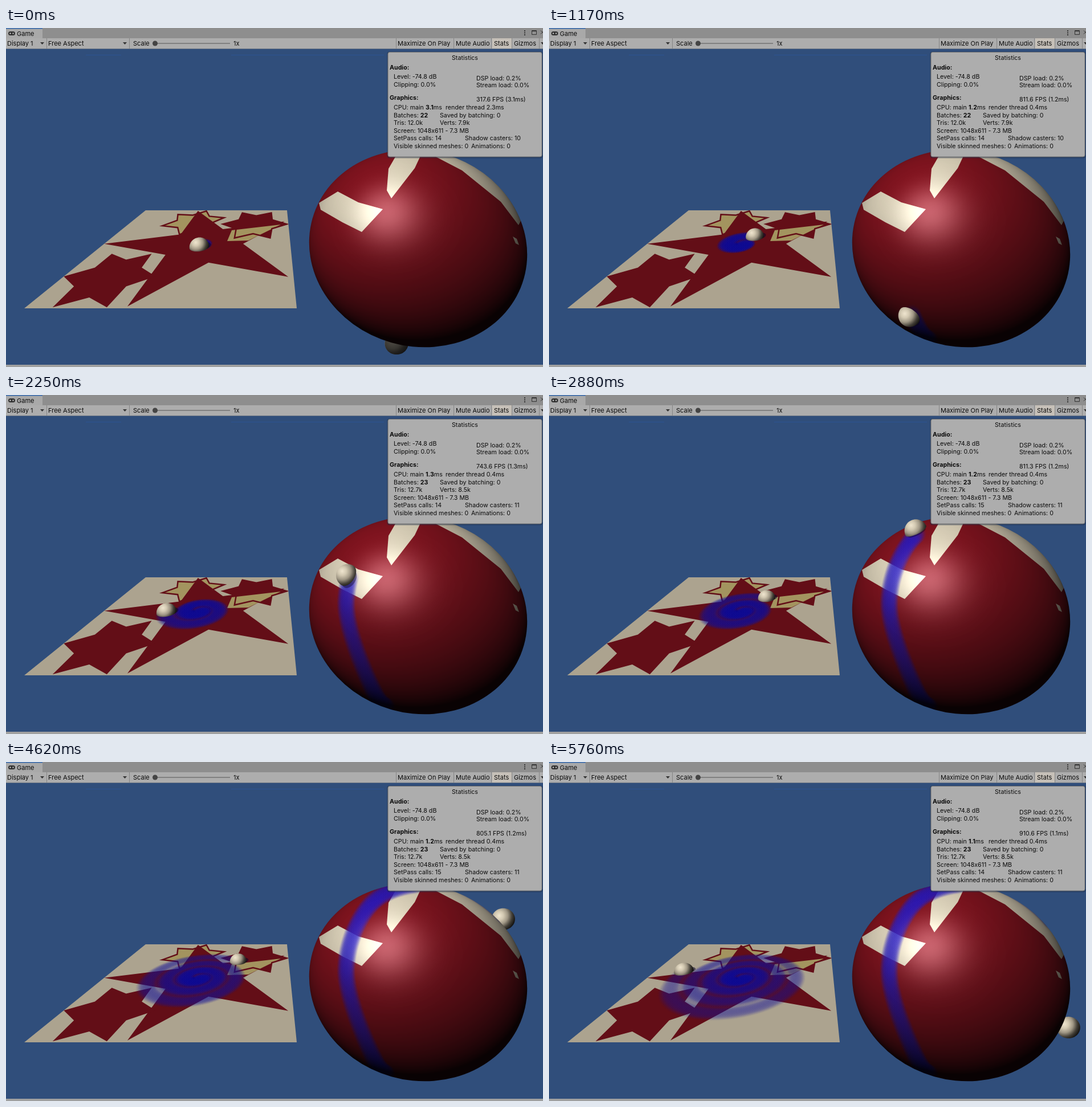
An HTML page with a canvas that plays this animation: 942 by 595 pixels, repeating every 5.79 s.

```html
<!DOCTYPE html>
<html lang="en">
<head>
<meta charset="utf-8">
<title>Game view</title>
<style>
  html, body { margin: 0; width: 942px; height: 595px; overflow: hidden; background: #304e7b; }
  canvas, svg { position: absolute; left: 0; top: 0; display: block; }
  text { font-family: Inter, Roboto, sans-serif; font-size: 11px; fill: #0b0b0b; white-space: pre; }
  #panel text { font-size: 10.7px; }
  .b { font-weight: 700; }
</style>
</head>
<body>
<canvas id="view" width="942" height="595"></canvas>
<svg id="ui" width="942" height="595" viewBox="0 0 942 595"></svg>
<script>
const W = 942, H = 595, LOOP = 5790, FRAME = 30, STEP = 10, TAU = 2 * Math.PI;
const view = document.getElementById('view').getContext('2d');

function layer(w = W, h = H) {
  const c = document.createElement('canvas');
  c.width = w; c.height = h;
  return c.getContext('2d');
}

function poly(g, points, fill, stroke) {
  g.beginPath();
  points.forEach(p => g.lineTo(...p));
  g.closePath();
  if (fill) { g.fillStyle = fill; g.fill(); }
  if (stroke) { g.strokeStyle = stroke; g.lineWidth = 2.5; g.stroke(); }
}

/* ---------- ground plane, u and v from -1 to 1 ---------- */
const CREAM = '#aca38f', RED = '#630e17', TAN = '#a3945f';
const K = 0.3167, BX = -150.3, BY = -42.6;

// Screen position and local axes of a plane point
function ground(u, v) {
  const d = 1 - K * v;
  const x = (335.5 + 163.3 * u + BX * v) / d, y = (378.8 + BY * v) / d;
  return { x, y, ux: 163.3 / d, vx: (BX + K * x) / d, vy: (BY + K * y) / d };
}
const spot = (u, v) => { const p = ground(u, v); return [p.x, p.y]; };
const PLANE = [spot(-1, -1), spot(1, -1), spot(1, 1), spot(-1, 1)];

function star(cu, cv, ru, rv, tips, inner, turn = 0) {
  return Array.from({ length: 2 * tips }, (_, i) => {
    const a = Math.PI * (1 + i / tips) + turn, r = i % 2 ? inner : 1;
    return spot(cu + ru * r * Math.cos(a), cv + rv * r * Math.sin(a));
  });
}

const base = layer();
base.fillStyle = '#304e7b';
base.fillRect(0, 0, W, H);
base.fillStyle = '#2c5493';
base.fillRect(140, 47, 62, 1);
base.fillRect(395, 47, 268, 1);
poly(base, PLANE, CREAM);
base.save();
poly(base, PLANE);
base.clip();
const farStar = star(0.58, -0.52, 0.4, 0.44, 6, 0.62);
poly(base, star(-0.2, -0.6, 0.38, 0.38, 6, 0.62, -0.35), TAN, RED);
poly(base, farStar, RED);
poly(base, star(0.08, 0, 1.08, 1.03, 5, 0.382), RED);
poly(base, [[388, 374], [396, 355], [482, 345], [425, 373]], TAN);
poly(base, farStar, null, RED);
poly(base, star(-0.6, 0.6, 0.4, 0.45, 6, 0.62), RED);
base.restore();

// The first marker winds outwards at a steady turn rate
function spiral(t) {
  const a = (60 + 0.2105 * t) * Math.PI / 180, r = 0.08 + 0.000106 * t;
  return ground(r * Math.cos(a), r * Math.sin(a));
}

/* ---------- big sphere ---------- */
const SX = 525, SY = 208, SW = 396, SH = 358, MID = [723, 387];
const CEN = [1.3834, 0.3925, 2.992], FOCAL = 484, LIGHT = [-0.537, -0.634, -0.562];
const dot = (a, b) => a[0] * b[0] + a[1] * b[1] + a[2] * b[2];
const unit = a => { const l = Math.hypot(...a); return a.map(c => c / l); };

function shadeSphere() {
  const shade = layer(SW, SH), gloss = layer(SW, SH);
  const a = shade.createImageData(SW, SH), b = gloss.createImageData(SW, SH);
  const cc = dot(CEN, CEN) - 1;
  for (let j = 0, i = 0; j < SH; j++) for (let k = 0; k < SW; k++, i += 4) {
    const d = [(k + SX + 0.5 - 471) / FOCAL, (j + SY + 0.5 - 315.5) / FOCAL, 1];
    const dd = dot(d, d), dc = dot(d, CEN);
    const s = (dc - Math.sqrt(Math.max(0, dc * dc - dd * cc))) / dd;
    const n = unit(d.map((c, m) => c * s - CEN[m]));
    const eye = unit(d.map(c => -c));
    const half = unit(eye.map((c, m) => c + LIGHT[m]));
    const lit = Math.max(0, dot(n, LIGHT));
    const spec = lit && 80 * Math.pow(Math.max(0, dot(n, half)), 23);
    a.data.fill(255 * (0.07 + 0.93 * lit), i, i + 3);
    b.data.fill(spec, i, i + 3);
    a.data[i + 3] = b.data[i + 3] = 255;
  }
  shade.putImageData(a, 0, 0);
  gloss.putImageData(b, 0, 0);
  return [shade.canvas, gloss.canvas];
}
const [shadeMap, glossMap] = shadeSphere();

const PALE = '#dcd2ba';
const skin = layer(SW, SH);
skin.translate(-SX, -SY);
skin.fillStyle = '#80131e';
skin.fillRect(SX, SY, SW, SH);
poly(skin, [[582, 287], [618, 306], [661, 318], [624, 358], [590, 341], [552, 319], [549, 307]], PALE);
poly(skin, [[690, 214], [732, 214], [717, 246], [676, 299], [668, 285], [671, 247]], PALE);
poly(skin, [[752, 225], [790, 212], [850, 253], [906, 333], [899, 346], [868, 305], [800, 250]], PALE);
poly(skin, [[889, 366], [896, 370], [900, 381], [894, 378]], PALE);

const ball = layer(SW, SH);
function paintSphere() {
  const op = (mode, img) => { ball.globalCompositeOperation = mode; ball.drawImage(img, 0, 0); };
  op('copy', skin.canvas);
  op('source-over', orbitTrail.canvas);
  op('multiply', shadeMap);
  op('lighter', glossMap);
  ball.globalCompositeOperation = 'destination-in';
  ball.beginPath();
  ball.ellipse(MID[0] - SX, MID[1] - SY, 192.7, 171.7, 0.277, 0, TAU);
  ball.fill();
}

/* ---------- orbit of the second marker ---------- */
// Evenly timed key points; the outer two only steer the curve
const ORBIT = [[700, 530], [685, 554], [645, 531], [592, 366], [645, 237],
  [772, 212], [891, 302], [911, 470], [870, 545]];
const LEG = LOOP / 6, RISE = 500, SET = 3500;

function orbit(t) {
  const i = Math.floor(t / LEG), s = t / LEG - i;
  const [p, q, r, e] = ORBIT.slice(i, i + 4);
  return q.map((c, k) => c + s / 2 * (r[k] - p[k] + s * (2 * p[k] - 5 * c + 4 * r[k] - e[k]
    + s * (3 * (c - r[k]) + e[k] - p[k]))));
}

/* ---------- painted trails ---------- */
const groundTrail = layer(), orbitTrail = layer(SW, SH);
poly(groundTrail, PLANE);
groundTrail.clip();

function brush(g, rgb, alpha) {
  const b = g.createRadialGradient(0, 0, 0, 0, 0, 1);
  b.addColorStop(0, `rgba(${rgb},${alpha})`);
  b.addColorStop(0.55, `rgba(${rgb},${alpha})`);
  b.addColorStop(1, `rgba(${rgb},0)`);
  return b;
}
const groundInk = brush(groundTrail, '17,15,150', 0.085);
const orbitInk = brush(orbitTrail, '36,25,190', 0.1);

function disc(g, fill, m, r = 1) {
  g.save();
  g.transform(...m);
  g.fillStyle = fill;
  g.beginPath();
  g.arc(0, 0, r, 0, TAU);
  g.fill();
  g.restore();
}

const WARMUP = -400;
let painted = LOOP;
function paintTrails(t) {
  if (t < painted) {
    painted = WARMUP;
    groundTrail.clearRect(0, 0, W, H);
    orbitTrail.clearRect(0, 0, SW, SH);
  }
  for (; painted <= t; painted += STEP) {
    const p = spiral(painted), r = 0.112;
    disc(groundTrail, groundInk, [p.ux * r, 0, p.vx * r, p.vy * r, p.x, p.y]);
    if (painted > RISE && painted < 4700) {
      // the marker floats a little above the painted skin
      const front = painted < SET, w = front ? 17 : 11, shrink = front ? 0.965 : 1;
      const [x, y] = orbit(painted).map((c, k) => MID[k] + (c - MID[k]) * shrink);
      disc(orbitTrail, orbitInk, [w, 0, 0, w, x - SX, y - SY]);
    }
  }
}

/* ---------- markers ---------- */
// Half ball with ground axes U, V and height axis N
function dome(x, y, U, V, N, R, dim = 0) {
  const outline = Array.from({ length: 60 }, (_, i) => {
    const c = Math.cos(i * TAU / 60), s = Math.sin(i * TAU / 60);
    const u = c * U[0] + s * U[1], v = c * V[0] + s * V[1], h = Math.max(0, c * N[0] + s * N[1]);
    const l = Math.hypot(u, v, h);
    return [x + (U[0] * u + V[0] * v + N[0] * h) / l, y + (U[1] * u + V[1] * v + N[1] * h) / l];
  });
  const fx = x - 0.36 * R + 0.15 * N[0], fy = y - 0.3 * R + 0.2 * N[1];
  const g = view.createRadialGradient(fx, fy, 0, fx, fy, 1.5 * R);
  ['#efe5cf', '#d3c9b2', '#a09785', '#423e36', '#0b0a09'].forEach((c, i) => g.addColorStop(i / 4, c));
  poly(view, outline, g);
  if (dim) poly(view, outline, `rgba(22,22,22,${dim})`);
}

function groundMarker(t) {
  const p = spiral(t), r = 0.1, tall = p.ux * 0.88 * r;
  disc(view, 'rgba(12,6,40,.55)', [p.ux, 0, p.vx, p.vy, p.x + 5, p.y - 2], 0.09);
  dome(p.x, p.y, [p.ux * r, 0], [p.vx * r, p.vy * r], [(p.x - 474) / 1230 * tall, -tall], p.ux * r);
}

function orbitMarker(t, behind) {
  const [x, y] = orbit(t);
  if (behind) {
    dome(x, y, [20.5, 0], [0, 19], [0, 0], 20, 0.75 * Math.max(0, 1 - t / RISE));
    return;
  }
  const mx = (x - MID[0]) / 191, my = (y - MID[1]) / 173, m = Math.min(0.95, Math.hypot(mx, my));
  const a = Math.atan2(my, mx), c = Math.cos(a) * 20, s = Math.sin(a) * 20;
  const w = Math.sqrt(1 - m * m);
  view.fillStyle = 'rgba(8,4,20,.4)';
  view.beginPath();
  view.ellipse(x + 5 * w, y + 10 * w, 17, 17 * w, a + Math.PI / 2, 0, TAU);
  view.fill();
  dome(x, y, [-s, c], [c * w, s * w], [c * m, s * m], 20);
}

/* ---------- editor chrome ---------- */
const text = (x, y, s, extra = '') => `<text x="${x}" y="${y}" ${extra}>${s}</text>`;
const rect = (x, y, w, h, fill, extra = '') =>
  `<rect x="${x}" y="${y}" width="${w}" height="${h}" fill="${fill}" ${extra}/>`;
const arrow = x => `<path d="M${x} 25h7l-3.5 4z" fill="#333"/>`;

document.getElementById('ui').innerHTML =
  rect(0, 0, W, 18, '#8e8e8e') + rect(0, 0, 64, 18, '#a9a9a9') + rect(0, 0, 64, 1.5, '#3568ad') +
  rect(0, 18, W, 18, '#adadad') + rect(0, 36, W, 1, '#6f7987') + rect(0, 591, W, 4, '#a0a0a0') +
  rect(853, 18, 34, 18, '#c6c0b8') +
  [71, 216, 684, 785, 851, 887, 935].map(x => rect(x, 18, 1, 18, '#858585')).join('') +
  rect(4, 6, 12, 7, '#333', 'rx="3.5"') +
  '<path d="M6 9.5h3M7.5 8v3" stroke="#bbb"/><circle cx="12.5" cy="9.5" r="1.2" fill="#bbb"/>' +
  text(19, 13.5, 'Game') + text(2, 31, 'Display 1') + text(74, 31, 'Free Aspect') +
  text(223, 31, 'Scale') + text(399, 31, '1x') + arrow(60) + arrow(205) + arrow(938) +
  rect(262, 26.5, 131, 1, '#555') + '<circle cx="261.5" cy="27" r="4.5" fill="#444"/>' +
  text(687, 31, 'Maximize On Play') + text(789, 31, 'Mute Audio') +
  text(856, 31, 'Stats') + text(891, 31, 'Gizmos') +
  [4, 7.5, 11].map(y => rect(909, y, 2, 2, '#333')).join('') +
  '<path d="M922.5 4.5h8v7h-8zM922 5.500h9M938 4.500l6 6M944 4.500l-6 6" fill="none" stroke="#333"/>' +
  '<g id="panel">' + rect(668.5, 41.5, 273, 187, '#1c2c45', 'rx="4" opacity=".45"') +
  rect(670, 42.5, 270, 183.5, '#adadad', 'rx="3" stroke="#777"') +
  text(805, 56, 'Statistics', 'text-anchor="middle"') +
  text(673, 73, 'Audio:', 'class="b"') + text(680, 89, 'Level: -74.8 dB') + text(680, 103, 'Clipping: 0.0%') +
  text(825, 92, 'DSP load: 0.2%') + text(825, 104, 'Stream load: 0.0%') +
  text(673, 126, 'Graphics:', 'class="b"') + text(825, 129, '', 'id="fps"') +
  text(680, 143, 'CPU: main <tspan class="b" id="cpu"></tspan>ms') + text(771, 143, '', 'id="render"') +
  text(680, 157, 'Batches: <tspan class="b" id="batches"></tspan>') + text(761, 157, 'Saved by batching: 0') +
  text(680, 170, '', 'id="tris"') + text(761, 170, '', 'id="verts"') +
  text(680, 184, 'Screen: 1048x611 - 7.3 MB') +
  text(680, 197, '', 'id="pass"') + text(805, 197, '', 'id="casters"') +
  text(680, 211, 'Visible skinned meshes: 0') + text(816, 211, 'Animations: 0') + '</g>';

const RATES = [317.6, 811.6, 743.6, 811.3, 776.3, 805.1, 910.6];
let shown;
function showStats(t) {
  const i = Math.round(t / LEG);
  if (i === shown) return;
  shown = i;
  const ms = (1000 / RATES[i]).toFixed(1);
  const more = i > 1 && i !== 4;      // the second marker is in sight
  const values = {
    fps: `${RATES[i]} FPS (${ms}ms)`, cpu: ms, render: `render thread ${i ? 0.4 : 2.3}ms`,
    batches: more ? 23 : 22, tris: `Tris: ${more ? '12.7k' : '12.0k'}`,
    verts: `Verts: ${more ? '8.5k' : '7.9k'}`, pass: `SetPass calls: ${more && i % 2 ? 15 : 14}`,
    casters: `Shadow casters: ${more ? 11 : 10}`
  };
  for (const id in values) document.getElementById(id).textContent = values[id];
}

/* ---------- loop ---------- */
let start;
function draw(now) {
  start ??= now;
  const t = Math.floor(((now - start) % LOOP) / FRAME) * FRAME;
  const behind = t < RISE || t > SET;
  paintTrails(t);
  paintSphere();
  view.drawImage(base.canvas, 0, 0);
  if (behind) orbitMarker(t, true);
  view.drawImage(ball.canvas, SX, SY);
  if (!behind) orbitMarker(t, false);
  view.drawImage(groundTrail.canvas, 0, 0);
  groundMarker(t);
  showStats(t);
  requestAnimationFrame(draw);
}
requestAnimationFrame(draw);
</script>
</body>
</html>
```
